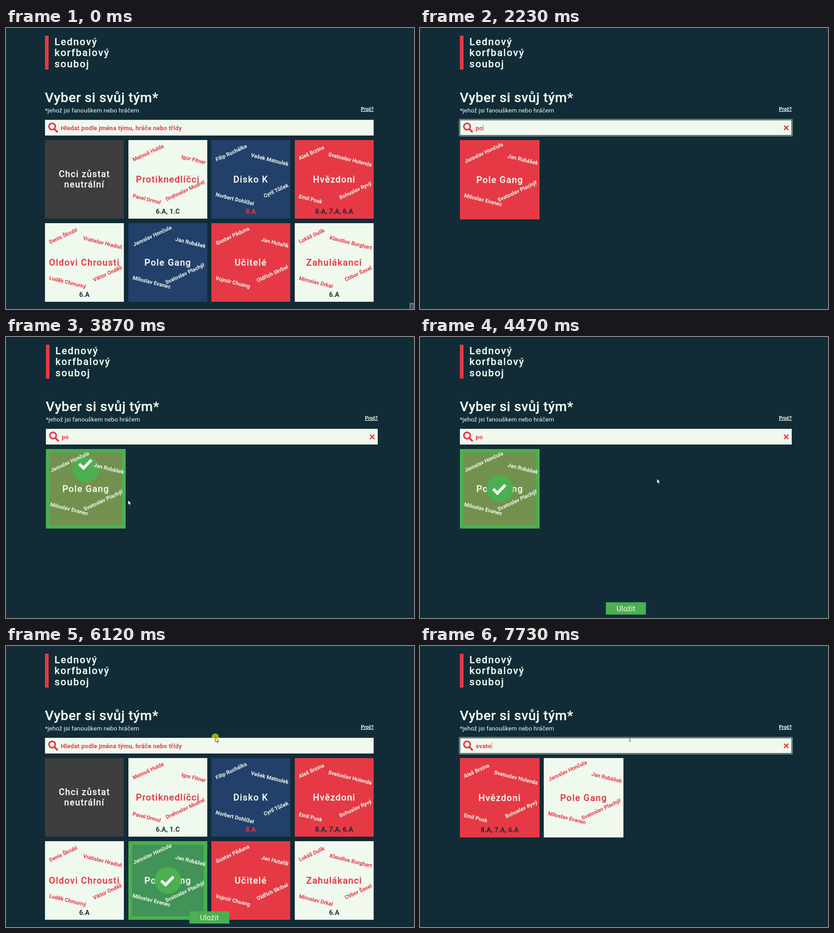
An HTML page for the animation above (8 s loop, 900 by 622 pixels).

```html
<!DOCTYPE html>
<html lang="cs">
<head>
<meta charset="utf-8">
<style>
html, body { margin: 0; width: 100%; height: 100%; overflow: hidden; background: #112c37; }
svg { display: block; width: 900px; height: 622px; }
svg svg { width: auto; height: auto; }
text { font-family: Roboto, sans-serif; font-weight: 500; white-space: pre; stroke-width: .25px; }
.thin { font-weight: 400; stroke: none; }
</style>
</head>
<body>
<svg viewBox="0 0 900 622" xmlns="http://www.w3.org/2000/svg"><g id="page"></g><g id="live"></g></svg>
<script>
const LOOP = 8000;
const DARK = '#112c37', RED = '#e63946', CREAM = '#f0f9ee', BLUE = '#23406b', GREY = '#3d3d3d', GREEN = '#4caf50';
const page = document.getElementById('page'), live = document.getElementById('live');

// name, classes, people: top left, top right, bottom left, bottom right
const TEAMS = [
  ['Chci zůstat neutrální'],
  ['Protiknedlíčci', '6.A, 1.C', 'Matouš Hulda', 'Igor Fitner', 'Pavel Drmsl', 'Drahoslav Mudrel'],
  ['Disko K', '8.A', 'Filip Ruchálka', 'Vašek Matoulek', 'Norbert Dohlížel', 'Cyril Tůček'],
  ['Hvězdoni', '8.A, 7.A, 6.A', 'Aleš Brzina', 'Svatoslav Hulenda', 'Emil Pusk', 'Bohuslav Ryvý'],
  ['Oldovi Chrousti', '6.A', 'Denis Škrubl', 'Vratislav Hradoň', 'Luděk Chmurný', 'Viktor Onděš'],
  ['Pole Gang', '', 'Jaroslav Hončula', 'Jan Rubášek', 'Miloslav Evanec', 'Svatoslav Plachýř'],
  ['Učitelé', '', 'Gustav Pěduna', 'Jan Hutařík', 'Vojmír Chuang', 'Oldřich Skrbal'],
  ['Zahulákanci', '6.A', 'Lukáš Dulík', 'Klaudius Burghart', 'Miroslav Drkal', 'Ctibor Šavel']
];
const PICKED = 5;
// background, text, class label; repeats by position in the grid
const SKINS = [[RED, CREAM, DARK], [CREAM, RED, DARK], [BLUE, CREAM, RED]];

// time, query, focused, picked
const STEPS = [
  [0, '', 0, 0], [990, '', 1, 0], [1980, 'p', 1, 0], [2230, 'po', 1, 0],
  [3600, 'po', 0, 0], [3670, 'po', 0, 1], [5450, '', 0, 1], [6430, '', 1, 1],
  [6770, 's', 1, 0], [7130, 'sv', 1, 0], [7330, 'sva', 1, 0], [7580, 'svat', 1, 0], [7730, 'svato', 1, 0]
];
const BLINK = 540, DROP = 3715, RISE = 4020;

// pointer: time, x, y
const PATHS = [
  [[50, 880, 612], [200, 868, 536], [450, 720, 370], [700, 606, 225], [850, 600, 212], [1150, 600, 212]],
  [[3170, 885, 612], [3270, 886, 470], [3390, 590, 430], [3470, 430, 405], [3570, 215, 350], [3700, 215, 350],
   [3870, 269, 361], [4100, 300, 358], [4500, 540, 310], [4820, 731, 262], [5000, 780, 252], [5250, 806, 225],
   [5480, 806, 225], [5680, 462, 192], [5800, 462, 192], [6000, 462, 202], [6400, 462, 202], [6430, 463, 206], [8000, 463, 206]]
];
const CLICKS = [[850, 1100], [3570, 3760], [5320, 5480], [5720, 6270]];

const clamp = v => Math.max(0, Math.min(1, v));
const easeOut = p => 1 - (1 - clamp(p)) ** 2;
const rect = (x, y, w, h, fill, more = '') => `<rect x="${x}" y="${y}" width="${w}" height="${h}" fill="${fill}" ${more}/>`;
const text = (s, x, y, size, fill, gap = 0, more = '') =>
  `<text x="${x}" y="${y}" font-size="${size}" fill="${fill}" stroke="${fill}" letter-spacing="${gap}" ${more}>${s}</text>`;
const MID = 'text-anchor="middle"', THIN = 'class="thin"';

function grid(query) {
  const hits = TEAMS.map((team, i) => i).filter(i => TEAMS[i].join('|').toLowerCase().includes(query));
  const wide = hits.length > 4;
  const x = wide ? 86 : 88, width = wide ? 725 : 732;
  return { hits, x, width, size: (width - 29) / 4 };
}
function spot(g, i) {
  const step = g.size + 29 / 3;
  return [Math.round(g.x + i % 4 * step), Math.round(248 + Math.floor(i / 4) * step)];
}

function person(s, side, edge, y, angle, fill) {
  return text(s, 0, 4.2, 11.6, fill, .15,
    `${MID} class="p" data-side="${side}" data-edge="${edge}" data-y="${y}" data-angle="${angle}"`);
}

function tile(g, pos, picked) {
  const id = g.hits[pos], [name, label, ...who] = TEAMS[id], S = g.size, c = S / 2;
  const [x, y] = spot(g, pos);
  let out = `<g transform="translate(${x} ${y})">`;
  if (!id) {
    const cut = name.lastIndexOf(' ');
    return out + rect(0, 0, S, S, GREY) + text(name.slice(0, cut), c, 82, 19.6, CREAM, 1.35, MID) +
      text(name.slice(cut + 1), c, 105, 19.6, CREAM, 1.35, MID) + '</g>';
  }
  const [bg, ink, tag] = SKINS[pos % 3], on = picked && id === PICKED;
  out += rect(0, 0, S, S, bg);
  if (on) out += rect(0, 0, S, S, GREEN, 'opacity=".75"') +
    rect(4, 4, S - 8, S - 8, 'none', `stroke="${GREEN}" stroke-width="8"`);
  out += text(name, c, c + 7, 20, ink, 1.3, MID) + text(label, c, S - 11.5, 14.6, tag, .3, MID);
  if (on) out += `<svg width="${S}" height="${S}" style="width:${S}px;height:${S}px"><circle id="disc" cx="${c}" r="29.3" fill="${GREEN}"/>` +
    `<path id="tick" d="M${c - 14.5} 1l9.5 9.2L${c + 12.5} -8" fill="none" stroke="${CREAM}" stroke-width="6.5"/></svg>`;
  out += person(who[0], 1, 6.5, 28, -25, ink) + person(who[1], -1, S - 2.5, 43, 14, ink) +
    person(who[2], 1, 8.5, S - 43.5, 14, ink) + person(who[3], -1, S - 2, S - 62.5, -25, ink);
  return out + '</g>';
}

function drawPage([, query, focused, picked]) {
  const g = grid(query), x = g.x, right = x + g.width;
  let out = rect(0, 0, 900, 622, DARK) + rect(x, 17, 8, 75, RED);
  ['Lednový', 'korfbalový', 'souboj'].forEach((s, i) =>
    out += text(s, x + 21, 37.5 + i * 24.7, 22, CREAM, 1.8));
  out += text('Vyber si svůj tým*', x - .3, 164, 30, CREAM, .5) +
    text('*jehož jsi fanouškem nebo hráčem', x, 187, 13.4, CREAM, .07, THIN) +
    text('Proč?', right, 183, 10.6, CREAM, .2, 'text-anchor="end" text-decoration="underline"');
  if (focused) out += rect(x - 1.8, 201.8, g.width + 3.6, 37.6, CREAM, 'rx="2"') +
    rect(x - .9, 202.7, g.width + 1.8, 35.8, '#101c22', 'rx="1"') + rect(x + .5, 204.1, g.width - 1, 33, CREAM);
  else out += rect(x, 203.3, g.width, 34.7, CREAM);
  out += `<g fill="none" stroke="${RED}"><circle cx="${x + 15.8}" cy="218" r="7" stroke-width="3.4"/>` +
    `<path d="M${x + 20.5} 223l7.6 7.8" stroke-width="4"/>` +
    (query ? `<path d="M${right - 17} 216.3l9.4 9.4m0-9.4l-9.4 9.4" stroke-width="2.7"/>` : '') + '</g>';
  out += text(query || 'Hledat podle jména týmu, hráče nebo třídy', x + 35, 225.5, 13.2, RED, .44, 'id="query"');
  g.hits.forEach((id, pos) => out += tile(g, pos, picked));
  page.innerHTML = out;

  for (const p of page.querySelectorAll('.p')) {
    const { side, edge, y, angle } = p.dataset;
    const cx = +edge + side * p.getComputedTextLength() / 2;
    p.setAttribute('transform', `translate(${cx} ${y}) rotate(${angle})`);
  }
  return g;
}

function pointerAt(t) {
  const path = PATHS.find(p => t >= p[0][0] && t < p[p.length - 1][0]);
  if (!path) return null;
  const i = path.findIndex(k => k[0] > t), [t0, x0, y0] = path[i - 1], [t1, x1, y1] = path[i];
  const p = (t - t0) / (t1 - t0);
  return [x0 + (x1 - x0) * p, y0 + (y1 - y0) * p];
}

const ARROW = `<path d="M0 0v10.6l2.4-2.2 1.7 4 1.7-.8-1.7-3.8h3.4z" fill="#fff" stroke="#111" stroke-width=".8"/>`;
const HAND = `<path d="M-1 0q1-1.2 2 0v4.6l4.6 1.2q1.4.5 1.2 2l-.8 4.4h-5.6l-3.6-4.6q-.3-1.4 1-1.2l1.2 1z" fill="#fff" stroke="#111" stroke-width=".8"/>`;
const BEAM = `<path d="M-2.2-5h1.7l.5.6.5-.6h1.7M0-4.5v9M-2.2 5h1.7l.5-.6.5.6h1.7" fill="none" stroke="#444" stroke-width="1"/>`;

function pointer(t, g, query) {
  const at = pointerAt(t);
  if (!at) return '';
  const [x, y] = at, right = g.x + g.width;
  const overTile = g.hits.some((id, i) => {
    const [tx, ty] = spot(g, i);
    return x > tx && x < tx + g.size && y > ty && y < ty + g.size;
  });
  const overBar = y > 203 && y < 238 && x > g.x && x < right;
  const shape = overTile || overBar && query && x > right - 22 ? HAND : overBar ? BEAM : ARROW;
  const ring = CLICKS.some(([a, b]) => t >= a && t < b) ? '<circle cx="-.5" cy="-.5" r="8" fill="#ff0" opacity=".6"/>' : '';
  return `<g transform="translate(${x} ${y})">${ring}${shape}</g>`;
}

let shown = null, layout;
function render(t) {
  const step = STEPS.filter(s => s[0] <= t).pop(), [since, query, focused, picked] = step;
  if (step !== shown) { layout = drawPage(step); shown = step; }
  const g = layout;
  let out = '';
  if (picked) {
    const left = 1 - easeOut((t - DROP) / 400), c = g.size / 2;
    document.getElementById('disc').setAttribute('cy', c - 117 * left);
    document.getElementById('tick').setAttribute('transform', `translate(0 ${c - .5 - 149 * left})`);
    const x = g.x + g.width / 2 - 44, y = 622 - 34.8 * easeOut((t - RISE) / 400);
    out += rect(x, y, 88.4, 27.3, GREEN) + text('Uložit', x + 44.2, y + 19.3, 16.4, CREAM, 0, `${MID} ${THIN}`);
  }
  if (focused && t - since < BLINK) {
    const w = query ? document.getElementById('query').getComputedTextLength() : 0;
    out += rect(g.x + 35.3 + w, 213.5, .9, 15, RED);
  }
  if (t < 50) out += rect(890, 608, 10, 14, '#5f6b72') + text('Z', 893, 620, 9, '#222');
  live.innerHTML = out + pointer(t, g, query);
}

function tick(now) {
  render(now % LOOP);
  requestAnimationFrame(tick);
}
render(0);
requestAnimationFrame(tick);
</script>
</body>
</html>
```
